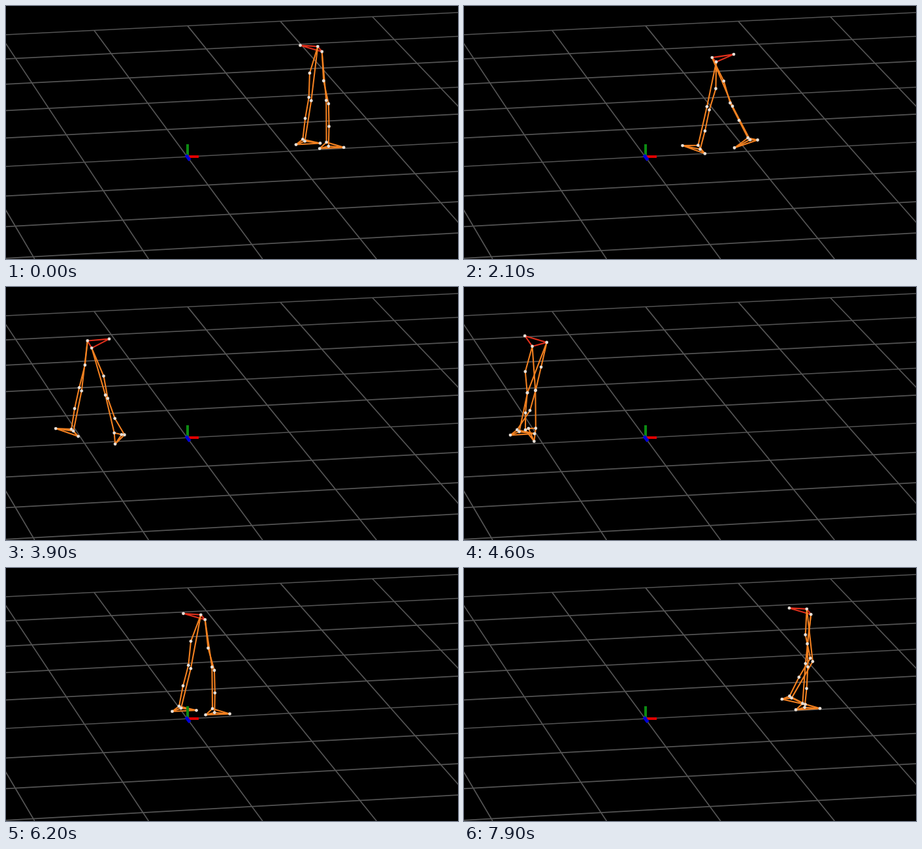
Write an HTML page with a canvas that moves like this. It is 692 px wide and 388 px high and loops after 8000 ms.

```html
<!DOCTYPE html>
<html lang="en">
<head>
<meta charset="utf-8">
<title>Walking markers</title>
<style>
  html, body { margin: 0; width: 692px; height: 388px; overflow: hidden; background: #000; }
  canvas { display: block; }
</style>
</head>
<body>
<canvas id="stage" width="692" height="388"></canvas>
<script>
const ctx = document.getElementById('stage').getContext('2d');
const LOOP = 8000, TICK = 100;
// The walk itself repeats after WALK ms; the figure stands at START
const WALK = 7400, START = 900, BOB = WALK / 12;
const TOE = [25, 6], HEEL = [-12, 6];

// Steps: heel-off time, flat-foot time, ankle x on landing
const left = { side: -1, from: 519, steps: [
  [1270, 2170, 356], [2490, 3390, 174], [3750, 4500, 83],
  [4952, 5852, 266.5], [6190, 7060, 456], [7480, 8150, 519]] };
const right = { side: 1, from: 520, steps: [
  [980, 1640, 439], [1866, 2766, 268], [3065, 3965, 98],
  [4390, 5215, 176], [5515, 6415, 354], [6615, 7620, 520]] };

// Pelvis path: time, x, y
const path = [
  [900, 524.5, 61.6], [1300, 512, 67], [2100, 398, 77.8], [3900, 143, 83.6],
  [4200, 116, 81], [4500, 104, 81], [4800, 107, 83], [5200, 138.5, 85.9],
  [6200, 286.5, 78.1], [7400, 465.5, 69.7], [7900, 513, 71.3], [8300, 524.5, 61.6]
];

const ramp = (t, a, b) => {
  const u = Math.min(1, Math.max(0, (t - a) / (b - a)));
  return u * u * (3 - 2 * u);
};
const hump = (s, mid, half) =>
  Math.abs(s - mid) < half ? Math.cos((s - mid) / half * Math.PI / 2) ** 2 : 0;
const add = (p, v, k = 1) => [p[0] + v[0] * k, p[1] + v[1] * k];
const mix = (p, q, k) => [p[0] + (q[0] - p[0]) * k, p[1] + (q[1] - p[1]) * k];
const spin = ([x, y], a) =>
  [x * Math.cos(a) - y * Math.sin(a), x * Math.sin(a) + y * Math.cos(a)];

// Ground direction on screen: 0 is right, 90 towards the viewer, 180 left
function dir(deg) {
  const [c, s] = spin([1, 0], deg * Math.PI / 180);
  return [c + .2 * s, -.045 * c + .28 * s];
}
const facing = t => t > 1500 && t < 4200 ? 180 : 0;
const bodyTurn = t => 180 * (ramp(t, 1000, 1700) - ramp(t, 3900, 5000));

// Each foot keeps to its own lane, a little nearer on the way back
function onGround(x, deg, side) {
  const back = deg === 180;
  return [x, 227.5 + (back ? 3.7 : 0) + 3.7 * side * (back ? -1 : 1) - .039 * x];
}

// Smooth path through the keys without overshoot
function follow(keys, t) {
  const last = keys.length - 1;
  let i = 0;
  while (i < last - 1 && keys[i + 1][0] < t) i++;
  const step = keys[i + 1][0] - keys[i][0], u = (t - keys[i][0]) / step, w = 1 - u;
  const rate = (j, c) => (keys[j + 1][c] - keys[j][c]) / (keys[j + 1][0] - keys[j][0]);
  const slope = (j, c) => {
    if (j === 0 || j === last) return 0;
    const a = rate(j - 1, c), b = rate(j, c);
    return a * b <= 0 ? 0 : 2 * a * b / (a + b);
  };
  return [1, 2].map(c => keys[i][c] * w * w * (1 + 2 * u) + keys[i + 1][c] * u * u * (3 - 2 * u)
    + step * u * w * (w * slope(i, c) - u * slope(i + 1, c)));
}

function footPose({ side, from, steps }, t) {
  const n = steps.filter(step => step[0] <= t).length;
  const plant = i => i < 0 ? [from, 0] : [steps[i][2], facing(steps[i][1])];
  const [x0, deg0] = plant(n - 2), [x1, deg1] = plant(n - 1);
  const s = n ? Math.min(1, (t - steps[n - 1][0]) / (steps[n - 1][1] - steps[n - 1][0])) : 1;
  const begin = .3 * Math.min(1, Math.abs(x1 - x0) / 150);
  const deg = deg0 + (deg1 - deg0) * ramp(s, 0, .5);
  const pitch = (36 * hump(s, .44, .34) - 22 * hump(s, .92, .09)) * Math.PI / 180;
  // The foot rolls over its toe or its heel
  const pivot = pitch > 0 ? TOE : HEEL;
  const [roll, drop] = add(pivot, spin(pivot, pitch), -1);
  const base = mix(onGround(x0, deg0, side), onGround(x1, deg1, side), ramp(s, begin, .95));
  const ankle = add(add(base, dir(deg), roll), [0, drop]);
  return { side, ankle, deg, pitch, bend: 6 + 24 * hump(s, .55, .33) };
}

function legMarkers(hip, foot, bodyDeg) {
  const { side, ankle, deg, pitch, bend } = foot;
  const fwd = dir(bodyDeg), out = dir(bodyDeg + 90 * side);
  const footFwd = dir(deg), footOut = dir(deg + 90 * side);
  const joint = add(add(hip, fwd, -14), [0, 12]);
  const dx = ankle[0] - joint[0], dy = ankle[1] - joint[1], len = Math.hypot(dx, dy);
  const knee = add(mix(joint, ankle, .515), [dy / len, -dx / len], bend * fwd[0]);
  const sole = point => {
    const [f, d] = spin(point, pitch);
    return add(add(ankle, footFwd, f), [0, d]);
  };
  return {
    hip,
    thigh: add(add(mix(hip, knee, .54), fwd, -4), out, 10),
    kneeOut: add(knee, out, 9),
    kneeIn: add(knee, out, -9),
    shank: add(mix(knee, ankle, .525), out, 12),
    ankleOut: add(add(ankle, footOut, 8), [0, .8]),
    ankleIn: add(add(ankle, footOut, -8), [0, -.8]),
    heel: sole(HEEL),
    toe: sole(TOE)
  };
}

function line(points, color, width) {
  ctx.strokeStyle = color;
  ctx.lineWidth = width;
  ctx.beginPath();
  points.forEach(p => ctx.lineTo(p[0], p[1]));
  ctx.stroke();
}

function drawGrid() {
  for (let k = 0; k < 9; k++) {
    const y = 44 + 36.3 * k + .82 * k * k;
    line([[0, y], [692, y - 34 - .6 * k]], '#545454', 1.7);
  }
  for (let k = -1; k < 5; k++) {
    const x = -9 + 144.5 * k - .5 * k * k;
    line([[x, 44 - x * .049], [218.3 + 174.5 * k, 388]], '#545454', 1.7);
  }
}

function drawAxes() {
  line([[278, 231], [295, 231]], '#e00000', 4);
  line([[278, 232], [278, 212]], '#0c8a12', 4);
  line([[275.5, 228.5], [281.5, 236.5]], '#0000d8', 5);
}

function drawLeg(m) {
  const color = '#f28020';
  line([m.hip, m.thigh, m.kneeOut, m.shank, m.ankleOut, m.heel, m.toe, m.ankleOut], color, 2.1);
  line([m.hip, m.kneeIn, m.ankleIn, m.heel], color, 2.1);
  line([m.ankleIn, m.toe], color, 2.1);
}

function drawWalker(t) {
  const deg = bodyTurn(t), fwd = dir(deg), across = dir(deg + 90);
  const footL = footPose(left, t), footR = footPose(right, t);
  const bob = 4 * Math.cos((t - 5170) / BOB * 2 * Math.PI);
  const front = add(add(follow(path, t), [0, bob]), fwd, 15);
  // The hip over the rear foot hangs lower
  const tilt = .015 * (footL.ankle[0] - footR.ankle[0]) * fwd[0];
  const hipL = add(add(front, across, -16), [0, -tilt]);
  const hipR = add(add(front, across, 16), [0, tilt]);
  const sacrum = add(add(front, fwd, -30), [0, -7]);
  const legs = [legMarkers(hipL, footL, deg), legMarkers(hipR, footR, deg)];
  line([sacrum, hipL, hipR, sacrum], '#e0301c', 2.1);
  legs.forEach(drawLeg);
  ctx.fillStyle = '#e6ded6';
  [sacrum, ...legs.flatMap(Object.values)].forEach(p => {
    ctx.beginPath();
    ctx.arc(p[0], p[1], 2.4, 0, 7);
    ctx.fill();
  });
}

function render(ms) {
  const t = Math.floor((ms % LOOP) / TICK) * TICK;
  ctx.fillStyle = '#000';
  ctx.fillRect(0, 0, 692, 388);
  ctx.lineJoin = 'round';
  drawGrid();
  drawWalker(START + (t - START + WALK) % WALK);
  drawAxes();
}

const begun = performance.now();
function loop() {
  render(performance.now() - begun);
  requestAnimationFrame(loop);
}
loop();
</script>
</body>
</html>
```
